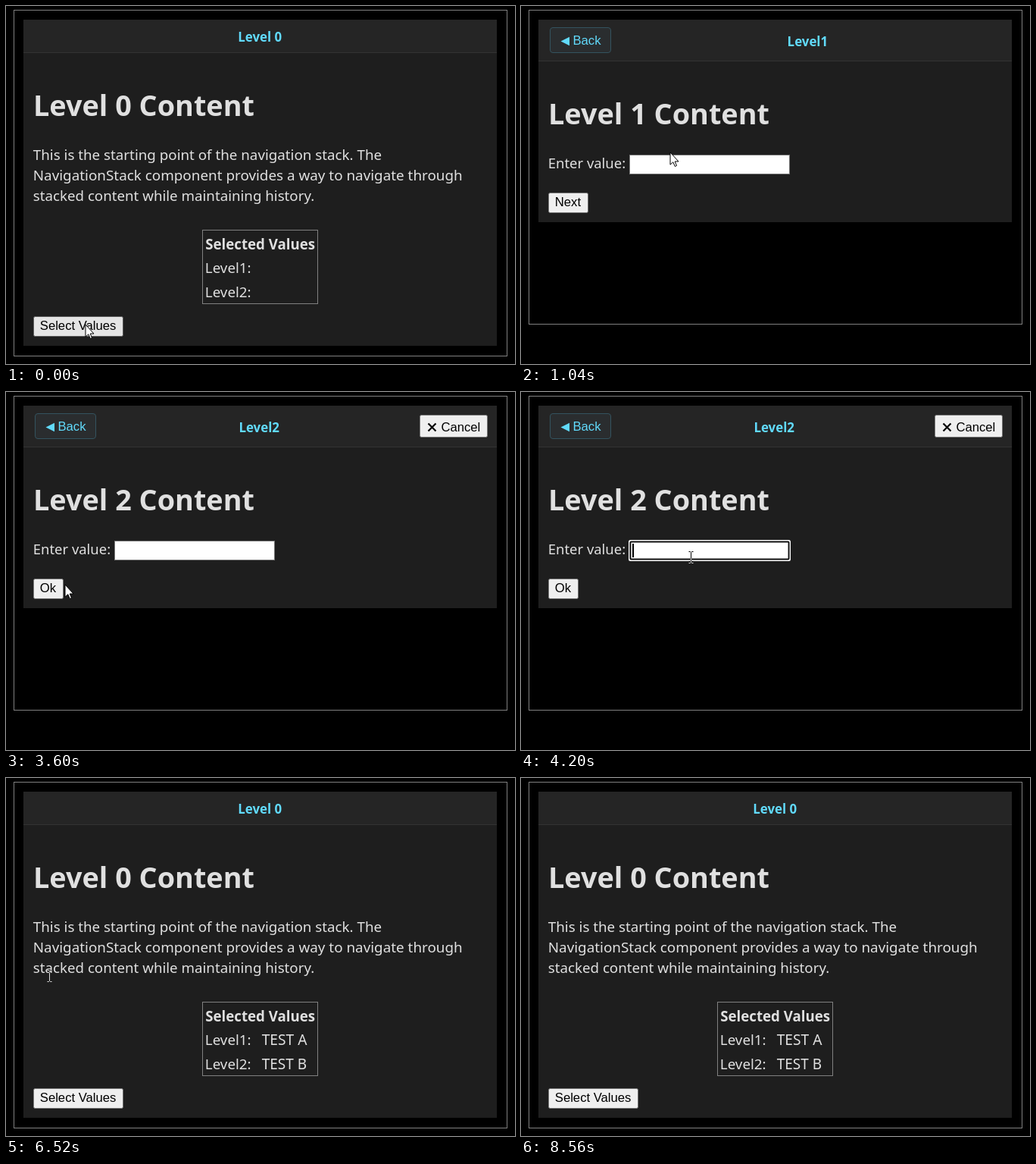
Animation of 672x472 px, one loop 8.6 s. Source, as an HTML page:

```html
<!DOCTYPE html>
<html lang="en">
<head>
<meta charset="utf-8">
<title>Navigation stack</title>
<style>
  html, body { margin: 0; width: 100%; height: 100%; overflow: hidden; background: #000; }
  svg { display: block; width: 672px; height: 472px; background: #000; }
  text { white-space: pre; }
  .ui { font-family: "Noto Sans", "Open Sans", sans-serif; fill: #e0e0e0; }
  .bold { font-weight: 700; }
  .title { fill: #61dafb; }
  .ctl { font: 16.667px "Liberation Sans", Arial, sans-serif; fill: #000; }
  .line { fill: none; stroke: #808080; }
  .btn { fill: #efefef; stroke: #767676; }
  .btn.over { fill: #e5e5e5; stroke: #5c5c5c; }
  .btn.down { fill: #f5f5f5; stroke: #8d8d8d; }
  #beam { mix-blend-mode: difference; }
</style>
</head>
<body>
<svg id="stage" viewBox="0 0 672 472"></svg>
<script>
const LOOP = 8600, STEP = 40;

// Screen changes: time, screen
const SCREENS = [[0, 0], [320, 1], [3560, 2], [6320, 0]];

// Pointer path: time, x, y
const PATH = [
  [0, 105, 420], [480, 105, 420], [720, 117, 340], [880, 148, 243],
  [1040, 197, 193], [1440, 197, 193], [1560, 203, 209], [2320, 203, 209],
  [2720, 142, 244], [2920, 66, 257], [3560, 66, 257], [4080, 224, 219],
  [4880, 224, 219], [5280, 113, 248], [5560, 113, 248], [5960, 92, 259],
  [6160, 58, 258], [6400, 57, 262], [6520, 57, 262], [6880, 287, 263]
];
const POINTER_OFF = 7280;

const FIELDS = {
  1: { text: "TEST A", keys: [1760, 1880, 1960, 2040, 2160, 2280], focus: [1560, 3120] },
  2: { text: "TEST B", keys: [4600, 4720, 4800, 4880, 5000, 5120], focus: [4120, 6240] }
};
const PRESSES = [[200, 320], [3120, 3560], [6240, 6320]];

const rect = (x, y, w, h, attrs) =>
  `<rect x="${x}" y="${y}" width="${w}" height="${h}" ${attrs}/>`;
const label = (x, y, size, str, cls = "") =>
  `<text class="ui ${cls}" x="${x}" y="${y}" font-size="${size}">${str}</text>`;
const ctl = (x, y, str, attrs = "") =>
  `<text class="ctl" x="${x}" y="${y}" ${attrs}>${str}</text>`;

function button(x, y, w, h, str) {
  return rect(x + .5, y + .5, w - 1, h - 1, 'rx="2" class="btn main"') + ctl(x + 8.8, y + 18.2, str);
}

function shell(frameEnd, headEnd, panelEnd) {
  return rect(10.5, 5.5, 651, frameEnd - 5, 'class="line"') +
    rect(23, 18, 625, panelEnd - 18, 'fill="#1e1e1e"') +
    rect(23, 18, 625, headEnd - 18, 'fill="#252525"') +
    rect(23, headEnd, 625, 1, 'fill="#333"');
}

function home() {
  return shell(461, 61, 448) +
    label(306.3, 46.5, 16.9, "Level 0", "bold title") +
    label(36, 144.5, 37.8, "Level 0 Content", "bold") +
    label(35.8, 203, 18.77, "This is the starting point of the navigation stack. The") +
    label(35.8, 230, 18.85, "NavigationStack component provides a way to navigate through") +
    label(35.8, 257, 18.72, "stacked content while maintaining history.") +
    rect(259.5, 295.5, 152, 97, 'class="line"') +
    label(263.2, 321, 18.7, "Selected Values", "bold") +
    label(262.8, 352, 18.8, "Level1:") +
    label(262.8, 383.5, 18.8, "Level2:") +
    `<g id="values">${label(337.7, 352, 19.2, "TEST A")}${label(337.7, 383.5, 19, "TEST B")}</g>` +
    button(36, 409, 119, 27, "Select Values");
}

function form(n, titleX, action, width) {
  const cancel = rect(546.5, 30.5, 89, 29, 'rx="2" class="btn"') +
    '<path d="M557.5 41.5L567.5 51.5M567.5 41.5L557.5 51.5" stroke="#000" stroke-width="2.2"/>' +
    ctl(574.4, 52, "Cancel");
  return shell(419, 72, 285) +
    rect(38.5, 28.5, 80, 33, 'rx="3.5" fill="#2a2d2f" stroke="#34535f"') +
    '<path d="M52.5 46.5L64 40.8V52.2Z" fill="#61dafb"/>' +
    ctl(68.5, 51, "Back", 'style="fill:#61dafb"') +
    label(titleX, 52.5, 16.9, "Level" + n, "bold title") +
    (n === 2 ? cancel : "") +
    label(36, 155.5, 37.8, `Level ${n} Content`, "bold") +
    label(35.8, 213.5, 18.45, "Enter value:") +
    rect(143.5, 196.5, 211, 25, 'fill="#fff" stroke="#767676"') +
    `<g class="ring">${rect(142, 195, 214, 28, 'rx="2.5" fill="#fff"')}
      ${rect(144.4, 197.4, 209.2, 23.2, 'rx="1" fill="#fff" stroke="#101010" stroke-width="2"')}</g>` +
    ctl(147.3, 214, "", 'id="typed' + n + '"') +
    rect(147, 200, 2, 18, 'class="caret" fill="#000"') +
    button(36, 246, width, 27, action);
}

const stage = document.getElementById("stage");
stage.innerHTML =
  `<g class="screen">${home()}</g>
   <g class="screen">${form(1, 351.6, "Next", 53)}</g>
   <g class="screen">${form(2, 307.4, "Ok", 40)}</g>
   <path id="arrow" d="M0 0V16.2L3.8 12.8L6.3 18.5L8.5 17.5L6.2 12H11Z" fill="#fff" stroke="#000" stroke-width="1"/>
   <path id="beam" d="M-3 -7.5H-1L0 -6.5L1 -7.5H3M0 -6.5V6.5M-3 7.5H-1L0 6.5L1 7.5H3" fill="none" stroke="#fff"/>`;

const screens = [...stage.querySelectorAll(".screen")];
const mains = screens.map(s => s.querySelector(".main"));
const values = document.getElementById("values");
const arrow = document.getElementById("arrow");
const beam = document.getElementById("beam");

const show = (el, on) => el.setAttribute("visibility", on ? "visible" : "hidden");
const within = (t, [a, b]) => t >= a && t < b;

function pointerAt(t) {
  const i = PATH.findIndex(p => p[0] > t);
  if (i < 0) return PATH[PATH.length - 1].slice(1);
  const [t0, x0, y0] = PATH[i - 1], [t1, x1, y1] = PATH[i];
  const k = (t - t0) / (t1 - t0);
  return [x0 + (x1 - x0) * k, y0 + (y1 - y0) * k];
}

function inside(el, x, y) {
  const get = a => +el.getAttribute(a);
  return x >= get("x") && x <= get("x") + get("width") && y >= get("y") && y <= get("y") + get("height");
}

function drawField(n, t) {
  const { text, keys, focus } = FIELDS[n];
  const typed = document.getElementById("typed" + n);
  const str = text.slice(0, keys.filter(k => k <= t).length);
  if (typed.textContent !== str) typed.textContent = str;
  const on = within(t, focus);
  const caret = screens[n].querySelector(".caret");
  caret.setAttribute("x", Math.round(147 + (str ? typed.getComputedTextLength() - 1 : 0)));
  caret.style.display = on ? "" : "none";
  screens[n].querySelector(".ring").style.display = on ? "" : "none";
}

function draw(t) {
  const cur = SCREENS.filter(s => s[0] <= t).pop()[1];
  screens.forEach((s, i) => { s.style.display = i === cur ? "" : "none"; });
  show(values, t >= SCREENS[3][0]);
  if (cur) drawField(cur, t);

  const [x, y] = pointerAt(t), live = t < POINTER_OFF;
  const over = live && inside(mains[cur], x, y);
  mains[cur].classList.toggle("over", over);
  mains[cur].classList.toggle("down", over && PRESSES.some(p => within(t, p)));

  const onText = cur ? x > 143 && x < 355 && y > 196 && y < 222 : y > 183 && y < 262.5;
  arrow.setAttribute("transform", `translate(${Math.round(x)} ${Math.round(y)})`);
  beam.setAttribute("transform", `translate(${Math.round(x) + .5} ${Math.round(y) - 1})`);
  show(arrow, live && !onText);
  show(beam, live && onText);
}

const start = performance.now();
function tick(now) {
  const t = Math.max(0, now - start) % LOOP;
  draw(Math.floor(t / STEP) * STEP);
  requestAnimationFrame(tick);
}
draw(0);
requestAnimationFrame(tick);
</script>
</body>
</html>
```
